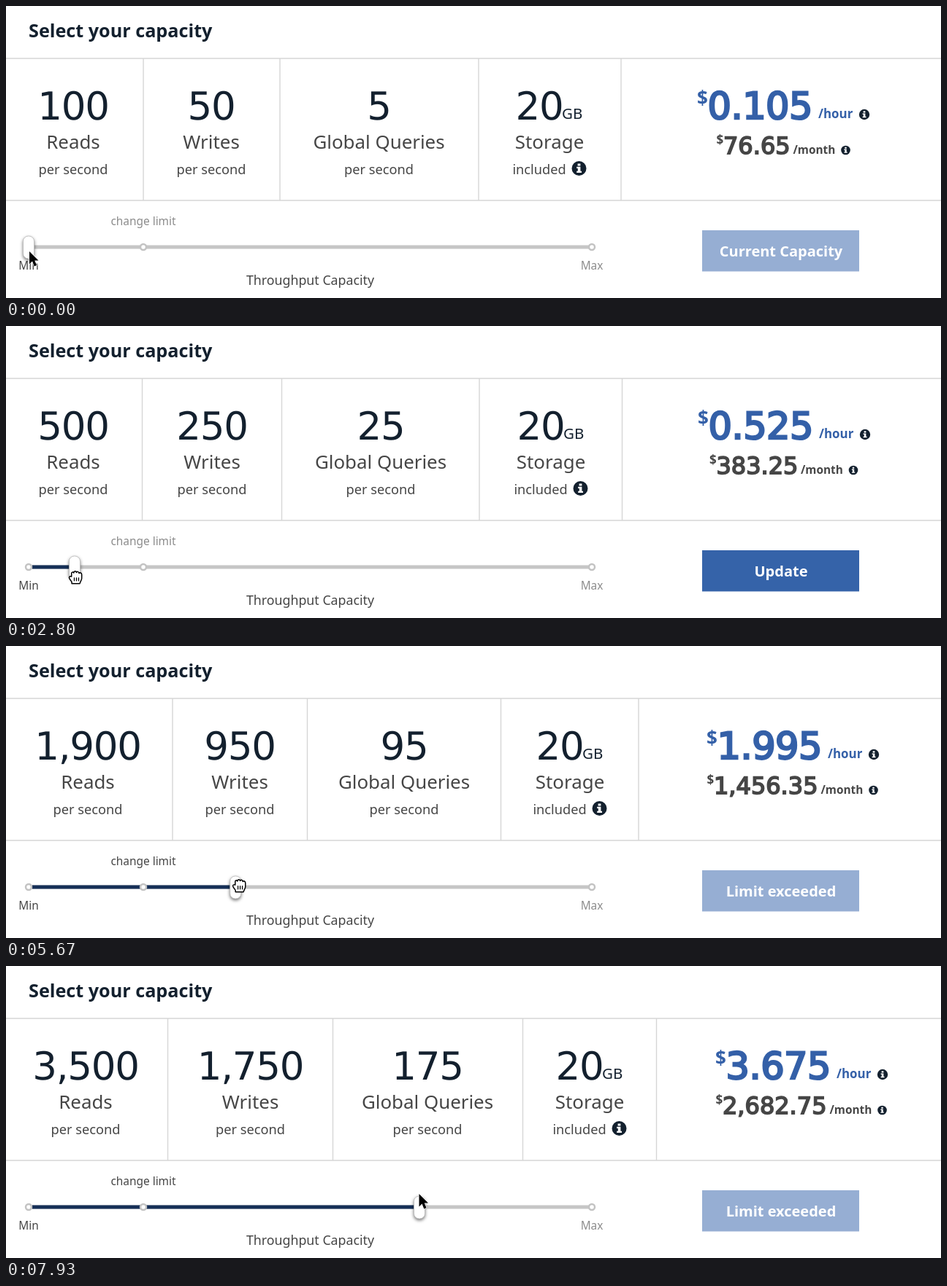
These frames come from a looping animation (1280x401 px, 8000 ms). An HTML page:

```html
<!DOCTYPE html>
<html lang="en">
<head>
<meta charset="utf-8">
<title>Select your capacity</title>
<style>
html, body { margin: 0; width: 100%; height: 100%; overflow: hidden; background: #fff; }
svg { display: block; width: 1280px; height: 401px; }
text { font-family: "Noto Sans", "Open Sans", sans-serif; fill: #464646; }
.mid text, text.mid { text-anchor: middle; }
.title { font-size: 25.2px; font-weight: 700; fill: #13202e; }
.count, .price { text-rendering: geometricPrecision; }
.count { font: 53px "DejaVu Sans", sans-serif; letter-spacing: -1.2px; fill: #13202e; }
.label { font-size: 25.9px; }
.note { font-size: 18.2px; }
.gb { font-size: 20.5px; fill: #13202e; }
.hour text { font-weight: 700; fill: #3460a8; }
.month text { font-weight: 700; }
.hour .price, .month .price { font-family: "DejaVu Sans", sans-serif; font-weight: 400; }
.hour .price { font-size: 51px; letter-spacing: -.5px; stroke: #3460a8; stroke-width: 2.6px; }
.month .price { font-size: 32px; stroke: #464646; stroke-width: 1.8px; }
.tick { font-size: 15.4px; }
.pale { fill: #8c8c8c; }
.action { font-size: 20px; font-weight: 700; fill: #fff; }
.rule { stroke: #d6d6d6; stroke-width: 1.4px; fill: none; }
.stop { fill: #fff; stroke: #c3c3c3; stroke-width: 2.5px; }
#knob rect { fill: #fff; stroke: #b9b9b9; stroke-width: .8px; filter: drop-shadow(0 2px 2px rgba(0, 0, 0, .55)); }
</style>
</head>
<body>
<svg viewBox="0 0 1280 401">
  <defs>
    <g id="info">
      <circle r="10" fill="#13202e"/>
      <path d="M-1.9 -6.6h3.8v3h-3.8zM-3.3 -2.2h5.2v6h1.6v2.2h-6.8v-2.2h1.6v-3.8h-1.6z" fill="#fff"/>
    </g>
  </defs>

  <text class="title" x="31" y="42.5">Select your capacity</text>
  <path class="rule" d="M0 72H1280M0 267H1280"/>
  <path class="rule" id="dividers"/>

  <g class="col mid">
    <text class="count" y="155.5"></text>
    <text class="label" y="196">Reads</text>
    <text class="note" y="231">per second</text>
  </g>
  <g class="col mid">
    <text class="count" y="155.5"></text>
    <text class="label" y="196">Writes</text>
    <text class="note" y="231">per second</text>
  </g>
  <g class="col mid">
    <text class="count" y="155.5"></text>
    <text class="label" y="196">Global Queries</text>
    <text class="note" y="231">per second</text>
  </g>
  <g class="col">
    <text class="count mid" x="-14" y="155.5">20</text>
    <text class="gb" x="17" y="155">GB</text>
    <text class="label mid" y="196">Storage</text>
    <text class="note mid" x="-14" y="231">included</text>
    <use href="#info" x="40.5" y="223"/>
  </g>

  <g class="hour">
    <text y="136" font-size="26">$</text>
    <text class="price" x="14.5" y="154.7"></text>
    <text x="166" y="154" font-size="16.9">/hour</text>
    <use href="#info" transform="translate(229 149) scale(.72)"/>
  </g>
  <g class="month">
    <text y="190" font-size="17">$</text>
    <text class="price" x="9.5" y="203"></text>
    <g class="unit">
      <text y="203" font-size="15.4">/month</text>
      <use href="#info" transform="translate(72 198) scale(.63)"/>
    </g>
  </g>

  <path d="M31 331H802" stroke="#c6c6c6" stroke-width="5"/>
  <path id="fill" stroke="#152f57" stroke-width="5"/>
  <circle class="stop" cx="31" cy="331" r="4"/>
  <circle class="stop" cx="188" cy="331" r="4"/>
  <circle class="stop" cx="802" cy="331" r="4"/>
  <text class="tick mid" id="limit" x="188" y="301">change limit</text>
  <text class="tick mid" x="31" y="362">Min</text>
  <text class="tick mid pale" x="802" y="362">Max</text>
  <text class="mid" x="416.5" y="383" font-size="17.8">Throughput Capacity</text>

  <rect id="button" x="953" y="308" width="215" height="56.5"/>
  <text class="action mid" x="1061" y="344"></text>

  <g id="knob"><rect x="-7.5" y="316" width="15" height="31" rx="7"/></g>

  <path id="arrow" d="M0 0V17.4L4 13.6L6.8 20.4L10 19L7.2 12.4H12.5Z"
    fill="#000" stroke="#fff" stroke-width="1.4" paint-order="stroke"/>
  <g id="hand" stroke="#000" stroke-width="1.5" stroke-linecap="round" stroke-linejoin="round">
    <path fill="#fff" d="M-5 8.7V6.6C-6 4.6 -8.6 2.6 -8.6 .6C-8.6 -1.4 -6.6 -1.4 -5.4 -.8V-4.4C-6 -7 -3 -8 -2.3 -6
      C-2 -8.8 1 -8.8 1.4 -6.4C2 -8.4 4.7 -8 5 -5.4C6 -7 8.6 -6 8.6 -3.4V1.5C8.6 4 6.6 6 6 8.7Z"/>
    <path fill="none" stroke-width="1.3" d="M-1.6 .8V4.8M1.4 .8V4.8M4.4 .8V4.8"/>
  </g>
</svg>

<script>
const LOOP = 8000, MIN_X = 31, STEP = 771 / 49, LIMIT = 11;
const GRAB = 600, RELEASE = 7900;

// Column layout for each digit count: dividers, centres, price offsets
const layouts = [
  { from: 20, lines: [221.5, 447.5, 707.5, 890.5], mids: [109, 334.5, 577, 799], hour: 971, month: 971.5, unit: 156 },
  { from: 10, lines: [228, 412.5, 677.5, 866], mids: [112, 320, 545, 772], hour: 959, month: 959.5, unit: 156 },
  { from: 2, lines: [186.5, 377.5, 648, 843.5], mids: [92, 282, 513, 746], hour: 947, month: 963, unit: 125 },
  { from: 1, lines: [188, 375, 647, 842], mids: [92, 281, 510.5, 744], hour: 946, month: 972.5, unit: 105 }
];

// Pointer path: time, x, y
const path = [
  [0, 29, 337], [1800, 29, 337], [2800, 95, 345], [3930, 166, 343],
  [4930, 237, 338], [6400, 400, 320], [7930, 567, 320], [LOOP, 567, 320]
];

const $ = s => document.querySelector(s);
const cols = [...document.querySelectorAll(".col")];
const counts = document.querySelectorAll(".col .count");
const move = (el, x, y = 0) => el.setAttribute("transform", `translate(${x} ${y})`);
const money = (v, d) => v.toLocaleString("en-US", { minimumFractionDigits: d, maximumFractionDigits: d });

function pointer(t) {
  const i = path.findIndex(k => k[0] > t);
  const [t0, x0, y0] = path[i - 1], [t1, x1, y1] = path[i];
  const p = (t - t0) / (t1 - t0);
  return [x0 + (x1 - x0) * p, y0 + (y1 - y0) * p];
}

function showPlan(n) {
  const plan = layouts.find(l => n >= l.from);
  $("#dividers").setAttribute("d", plan.lines.map(x => `M${x} 72V267`).join(""));
  cols.forEach((c, i) => move(c, plan.mids[i]));
  [100, 50, 5].forEach((k, i) => counts[i].textContent = money(k * n, 0));

  move($(".hour"), plan.hour);
  move($(".month"), plan.month);
  move($(".unit"), plan.unit);
  $(".hour .price").textContent = money(n * 0.105, 3);
  $(".month .price").textContent = money(n * 76.65, 2);

  const x = MIN_X + (n - 1) * STEP;
  move($("#knob"), x);
  $("#fill").setAttribute("d", n > 1 ? `M36 331H${x}` : "");
  $("#limit").classList.toggle("pale", n <= LIMIT);

  const open = n > 1 && n <= LIMIT;
  $("#button").setAttribute("fill", open ? "#3563a9" : "#96aed3");
  $(".action").textContent = open ? "Update" : n > 1 ? "Limit exceeded" : "Current Capacity";
}

let shown = 0;
function draw(now) {
  const t = now % LOOP;
  const [x, y] = pointer(t);
  const n = Math.max(1, Math.floor(1 + (x + 2 - MIN_X) / STEP));
  if (n !== shown) showPlan(shown = n);

  const held = t >= GRAB && t < RELEASE;
  $("#hand").style.display = held ? "" : "none";
  $("#arrow").style.display = held ? "none" : "";
  move($("#hand"), x, y);
  move($("#arrow"), t < GRAB ? 32 : 565.5, t < GRAB ? 337 : 313);
  requestAnimationFrame(draw);
}
draw(performance.now());
</script>
</body>
</html>
```
